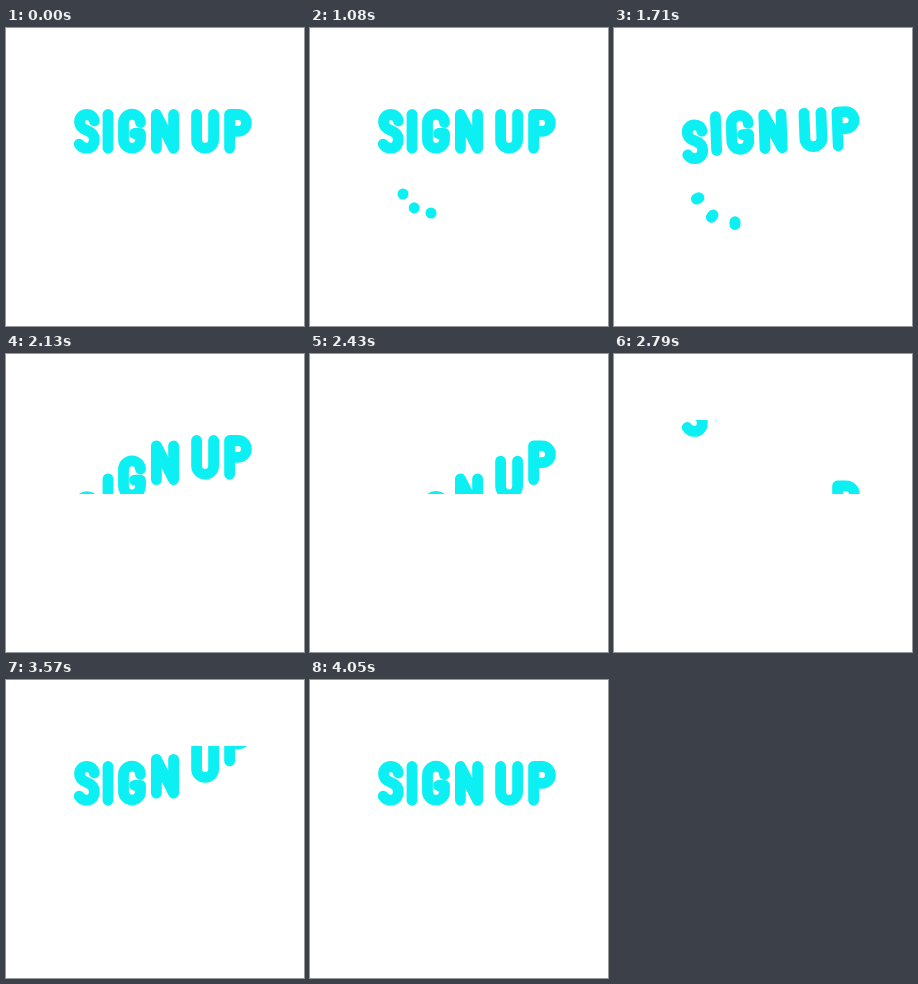
Animation, 298 px wide and 298 px high, one loop 4500 ms. Source, as an HTML page with a canvas:

```html
<!DOCTYPE html>
<html lang="en">
<head>
<meta charset="utf-8">
<title>Sign up</title>
<style>
  html, body { margin: 0; width: 100%; height: 100%; overflow: hidden; background: #fff; }
  canvas { display: block; width: 298px; height: 298px; }
</style>
</head>
<body>
<canvas width="298" height="298" role="img" aria-label="SIGN UP"></canvas>
<script>
const ctx = document.querySelector('canvas').getContext('2d');
const SIZE = 298, LOOP = 4500, STEP = 30;
const COLOR = '#0cf0f3';
const CLIP = { top: 66, bottom: 140 };
const PIVOT = { x: 157, y: 103 };

// Centre lines of the rounded letters
const letters = [
  'M88.3 93 C87.6 88.6 84.7 86.5 81 86.5 C76.5 86.5 73.5 89.6 73.5 94 C73.5 99.5 77.5 101.3 81.5 102.8 C86 104.5 88.3 107.2 88.3 111.7 C88.3 117 85 120.2 80.5 120.2 C77 120.2 74.7 118.6 73.2 116.2',
  'M102 86.5 V120.3',
  'M134.5 94.5 A8.5 8.5 0 0 0 117.5 95 V111.7 A8.5 8.5 0 0 0 134.5 111.7 V105.5 H128.5',
  'M150.4 120.3 V86.5 L167.6 120.3 V86.5',
  'M190.6 86.5 V111.7 A8.5 8.5 0 0 0 207.6 111.7 V86.5',
  'M223.6 120.3 V86.5 H232 A8.4 8.4 0 0 1 232 103.3 H223.6'
].map(d => new Path2D(d));

const sparks = [
  [93, 166, 82.4, 171],
  [104.2, 179.8, 97.4, 189.3],
  [121, 185, 121, 196.5]
];

const clamp = v => Math.min(1, Math.max(0, v));
const mix = (a, b, k) => a + (b - a) * k;
const smooth = k => k * k * (3 - 2 * k);

// Distance after speeding up over 250 ms to a constant speed
function run(time, speed) {
  const ramp = 250;
  if (time <= 0) return 0;
  return time < ramp ? speed * time * time / (2 * ramp) : speed * (time - ramp / 2);
}

// Drops out below, then comes back in from above
function offset(t, index) {
  const local = t - index * 150;
  return local < 2415 ? run(local - 1530, 0.118) : -run(3300 - local, 0.111);
}

function tilt(t) {
  const phase = (t - 1480) / 400;
  if (Math.abs(phase) >= 1) return 0;
  return -5.5 * Math.PI / 180 * Math.cos(phase * Math.PI / 2) ** 2;
}

function drawSparks(t) {
  if (t < 1080 || t >= 1830) return;
  const head = smooth(clamp((t - 1080) / 330));
  const tail = smooth(clamp((t - 1380) / 480));
  ctx.lineWidth = 11;
  for (const [x1, y1, x2, y2] of sparks) {
    ctx.beginPath();
    ctx.moveTo(mix(x1, x2, tail), mix(y1, y2, tail));
    ctx.lineTo(mix(x1, x2, head) + 0.01, mix(y1, y2, head));
    ctx.stroke();
  }
}

function drawWord(t) {
  ctx.save();
  ctx.beginPath();
  ctx.rect(0, CLIP.top, SIZE, CLIP.bottom - CLIP.top);
  ctx.clip();
  ctx.lineWidth = 10.8;
  letters.forEach((path, i) => {
    ctx.save();
    ctx.translate(PIVOT.x, PIVOT.y + offset(t, i));
    ctx.rotate(tilt(t));
    ctx.translate(-PIVOT.x, -PIVOT.y);
    ctx.stroke(path);
    ctx.restore();
  });
  ctx.restore();
}

function draw(t) {
  ctx.fillStyle = '#fff';
  ctx.fillRect(0, 0, SIZE, SIZE);
  ctx.strokeStyle = COLOR;
  ctx.lineCap = ctx.lineJoin = 'round';
  drawSparks(t);
  drawWord(t);
}

const start = performance.now();
function tick() {
  const t = (performance.now() - start) % LOOP;
  draw(Math.floor(t / STEP) * STEP);
  requestAnimationFrame(tick);
}
tick();
</script>
</body>
</html>
```
